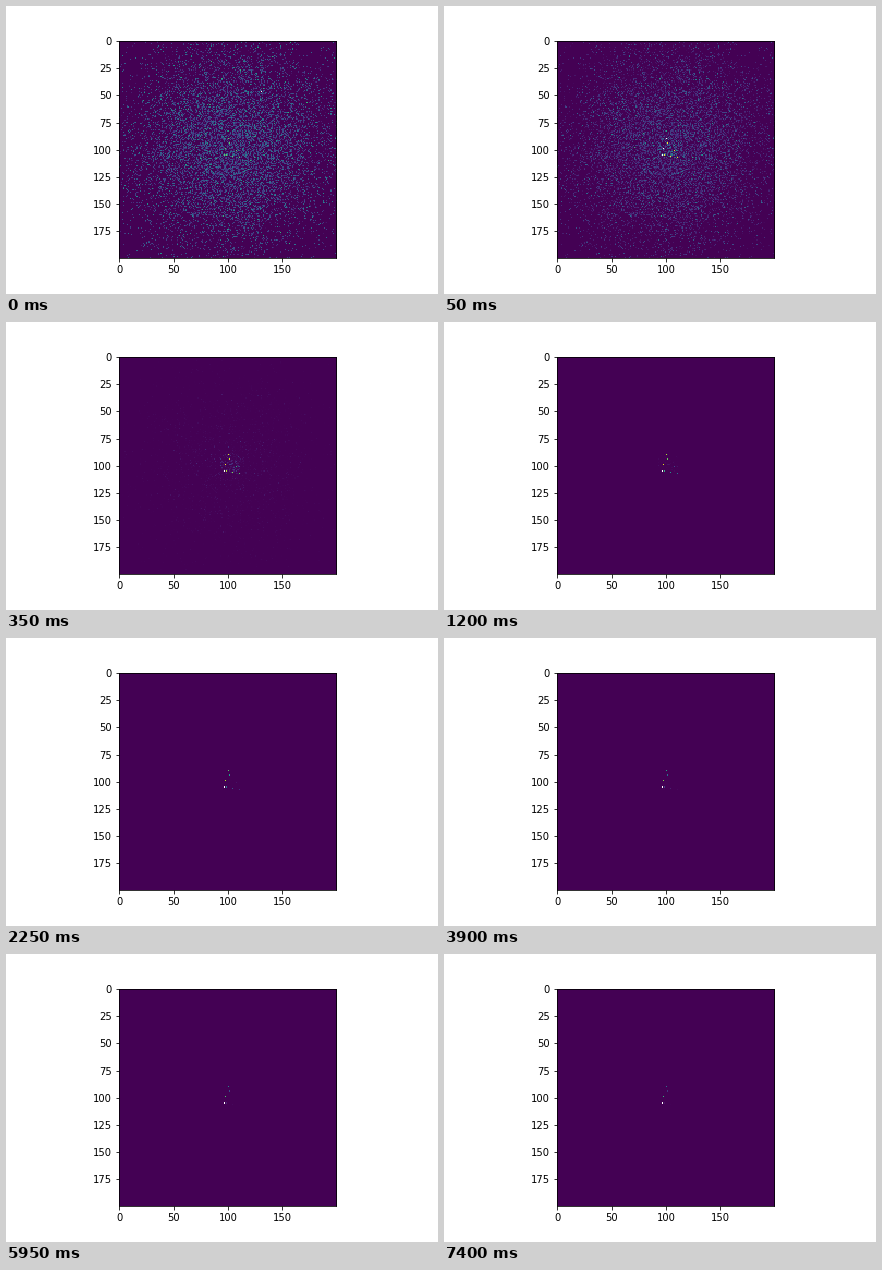
A matplotlib script that plays this animation: 432 px wide and 288 px high, repeating every 8000 ms.

```python
import numpy as np
import matplotlib.pyplot as plt
from matplotlib.animation import FuncAnimation

STEP = 50
FRAMES = 160
SIZE = 200

plt.rcParams["font.family"] = "DejaVu Sans"
plt.rcParams["font.size"] = 10

rng = np.random.default_rng(7)
rows, cols = np.mgrid[:SIZE, :SIZE]
radius = np.hypot(cols - 102, rows - 98)

# A sparse Gaussian cloud; cells near the centre fade more slowly.
present = rng.random((SIZE, SIZE)) < 0.55 * np.exp(-(radius / 75) ** 2)
start = present * np.clip(rng.gamma(4, 0.055, (SIZE, SIZE)), 0, 0.65)
rate = 0.002 * radius + rng.uniform(0.2, 1.3, (SIZE, SIZE))
rate[radius < 10] *= 0.4

# One bright cell that vanishes at once.
start[47, 130], rate[47, 130] = 1, 5

# Long-lived cells (column, row), the longest-lived first.
SURVIVORS = [(96, 105), (97, 99), (100, 90), (101, 94),
             (98, 105), (104, 106), (110, 107), (107, 101)]
for rank, (col, row) in enumerate(SURVIVORS):
    start[row, col] = 0.75
    rate[row, col] = (1.4 ** rank - 1) * STEP / 7000

# Every frame changes at first, then only in bursts: (first, last, steps).
BURSTS = [(0, 1050, 22), (1100, 2100, 8), (2250, 2950, 7), (3350, 3900, 5),
          (4200, 5100, 7), (5300, 6250, 6), (6450, 6800, 3), (7150, 7400, 2)]
CHANGES = np.concatenate(
    [np.round(np.linspace(*burst) / STEP) for burst in BURSTS])


def field(frame):
    """Brightness of all cells, scaled so that the strongest one is just over 1."""
    age = CHANGES[CHANGES <= frame].max()
    grid = start * np.exp(-rate * age)
    return 1.01 * grid / grid.max()


fig, ax = plt.subplots(figsize=(6, 4), dpi=72)
fig.subplots_adjust(left=0.125, right=0.9, bottom=0.125, top=0.88)
cmap = plt.get_cmap("viridis").with_extremes(over="white")
image = ax.imshow(field(0), cmap=cmap, vmin=0, vmax=1, interpolation="nearest")
ax.set_xticks(range(0, SIZE, 50))
ax.set_yticks(range(0, SIZE, 25))


def update(frame):
    image.set_data(field(frame))
    return [image]


anim = FuncAnimation(fig, update, frames=FRAMES, interval=STEP,
                     repeat=True, repeat_delay=0)
plt.show()
```
